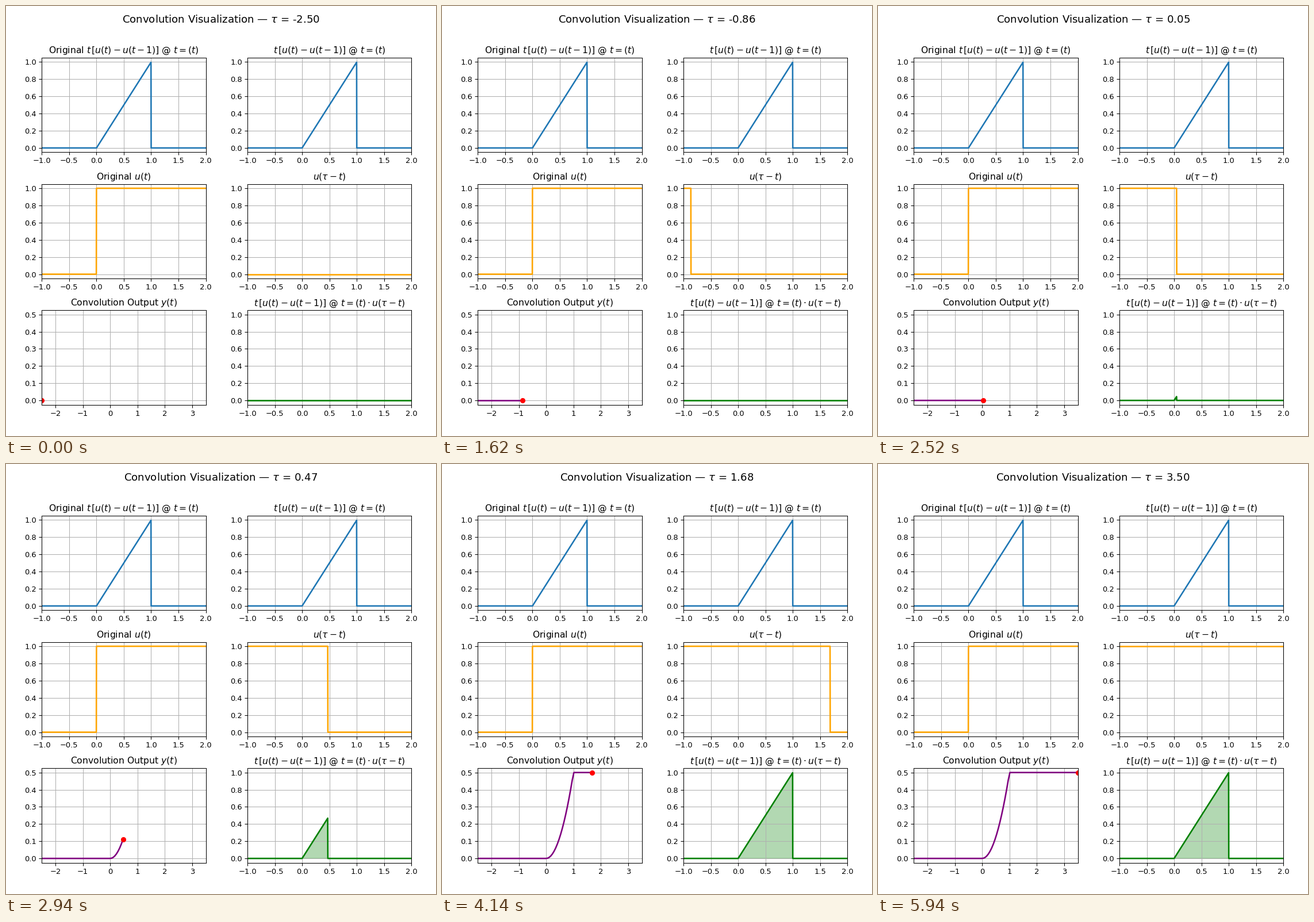
A matplotlib script for the animation above (6000 ms loop, 748 by 748 pixels).

```python
import numpy as np
import matplotlib.pyplot as plt
from matplotlib.animation import FuncAnimation

SIZE = 748
FRAMES = 100

# Panel layout in pixels, measured from the top left corner
LEFT, TOP = 62.3, 90.0
WIDTH, HEIGHT = 285.3, 164.4
STEP_X, STEP_Y = 357.7, 219.6

RAMP = r"t\,[u(t) - u(t-1)]"

t = np.linspace(-1, 2, 1000)
taus = np.linspace(-2.5, 3.5, FRAMES)
output = np.clip(taus, 0, 1) ** 2 / 2


def unit_step(x):
    return np.where(x >= 0, 1.0, 0.0)


ramp = t * (unit_step(t) - unit_step(t - 1))

fig = plt.figure(figsize=(8, 8), dpi=SIZE / 8)
heading = fig.suptitle("", fontsize=14, y=0.98)


def panel(row, col, title, xlim=(-1, 2), ylim=(-0.05, 1.05)):
    x = LEFT + col * STEP_X
    bottom = SIZE - TOP - row * STEP_Y - HEIGHT
    ax = fig.add_axes([x / SIZE, bottom / SIZE, WIDTH / SIZE, HEIGHT / SIZE])
    ax.set(xlim=xlim, ylim=ylim)
    ax.set_title(title, fontsize=12)
    ax.grid(True)
    return ax


def curve(ax, y, color):
    return ax.plot(t, y, color=color, lw=2)[0]


curve(panel(0, 0, f"Original ${RAMP}$ @ $t = (t)$"), ramp, "C0")
curve(panel(0, 1, f"${RAMP}$ @ $t = (t)$"), ramp, "C0")
curve(panel(1, 0, "Original $u(t)$"), unit_step(t), "orange")
flipped = curve(panel(1, 1, r"$u(\tau - t)$"), 0 * t, "orange")

ax_out = panel(2, 0, "Convolution Output $y(t)$", (-2.5, 3.5), (-0.025, 0.525))
trace, = ax_out.plot([], [], color="purple", lw=2)
dot, = ax_out.plot([], [], "ro")

ax_prod = panel(2, 1, rf"${RAMP}$ @ $t = (t) \cdot u(\tau - t)$")
product = curve(ax_prod, 0 * t, "green")
area, = ax_prod.fill(t, 0 * t, color="green", alpha=0.3)


def update(i):
    tau = taus[i]
    step = unit_step(tau - t)
    overlap = ramp * step
    flipped.set_ydata(step)
    product.set_ydata(overlap)
    outline = np.column_stack([t, overlap])
    area.set_xy(np.vstack([outline, [[t[-1], 0], [t[0], 0]]]))
    trace.set_data(taus[:i + 1], output[:i + 1])
    dot.set_data([tau], [output[i]])
    heading.set_text(rf"Convolution Visualization — $\tau$ = {tau:.2f}")
    return flipped, product, area, trace, dot, heading


anim = FuncAnimation(fig, update, frames=FRAMES, interval=60,
                     repeat=True, repeat_delay=0)
plt.show()
```
